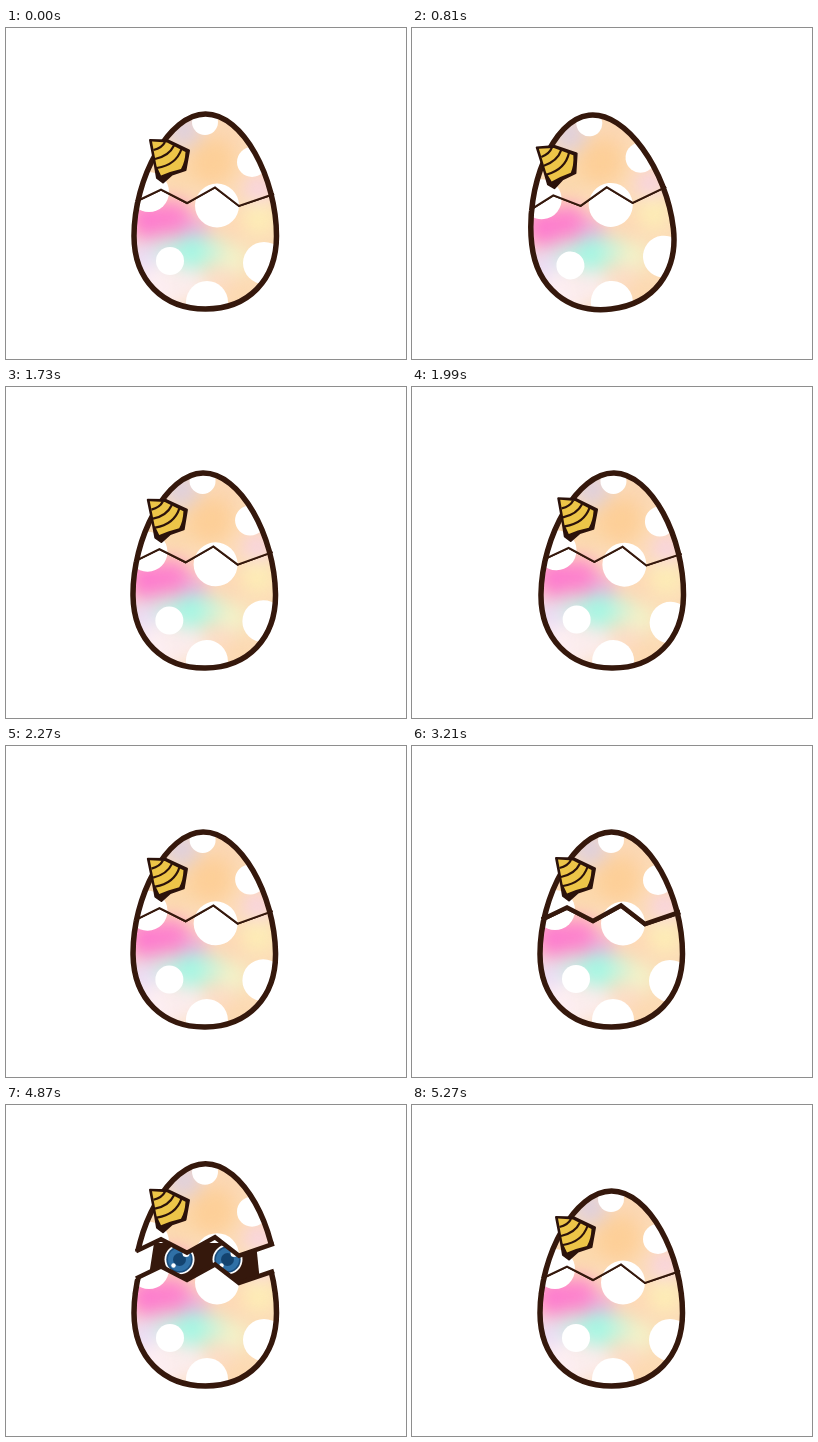
Recreate the animation shown at these times as an HTML page. Size 400 px wide and 331 px high, loop 6.37 s.

```html
<!DOCTYPE html>
<html lang="en">
<head>
<meta charset="utf-8">
<title>Hatching egg</title>
<style>
  html, body { margin: 0; width: 100%; height: 100%; overflow: hidden; background: #fff; }
  svg { display: block; width: 400px; height: 331px; }
  .line { fill: none; stroke: #35180c; stroke-width: 5.5; }
  .crack { fill: none; stroke: #35180c; stroke-width: 2; }
  .open .crack { stroke-width: 4.5; }
  #chick { display: none; }
  .open #chick { display: inline; }
</style>
</head>
<body>
<svg viewBox="0 0 400 331">
  <defs>
    <path id="shell" d="M199.500 86C163 86 128 150 128 208C128 252 157 281 199.500 281C242 281 270.500 252 270.500 208C270.500 150 237 86 199.500 86Z"/>
    <polyline id="zigzag" points="130,173.500 155,161.500 181,175 209,159.500 233,178 268,166"/>
    <clipPath id="shellClip"><use href="#shell"/></clipPath>
    <clipPath id="topClip"><path d="M100 60H300V159L268 166L233 178L209 159.500L181 175L155 161.500L130 173.500L100 188Z"/></clipPath>
    <clipPath id="bottomClip"><path d="M100 300H300V159L268 166L233 178L209 159.500L181 175L155 161.500L130 173.500L100 188Z"/></clipPath>
    <filter id="soft" x="-30%" y="-30%" width="160%" height="160%" color-interpolation-filters="sRGB">
      <feGaussianBlur stdDeviation="9"/>
    </filter>
    <g id="skin" clip-path="url(#shellClip)">
      <rect x="120" y="80" width="160" height="210" fill="#fcdcb8"/>
      <g id="blobs" filter="url(#soft)"></g>
      <g id="dots" fill="#fff"></g>
    </g>
    <g id="eye">
      <circle r="15" fill="#fff"/>
      <circle r="13.200" fill="#1b4d7c"/>
      <circle r="11.500" fill="#2f70a6"/>
      <circle r="6.500" fill="#13436f"/>
      <circle cx="6.500" cy="-6" r="3.500" fill="#fff"/>
      <circle cx="-6" cy="6" r="2.200" fill="#fff"/>
    </g>
  </defs>

  <g id="egg">
    <g id="chick">
      <path d="M148 138H250L254 177H142Z" fill="#35180c"/>
      <use href="#eye" x="173.500" y="154.500"/>
      <use href="#eye" x="221.500" y="154.500"/>
    </g>
    <g>
      <g clip-path="url(#bottomClip)">
        <use href="#skin"/>
        <use href="#shell" class="line"/>
      </g>
      <use href="#zigzag" class="crack"/>
    </g>
    <g id="cap">
      <g clip-path="url(#topClip)">
        <use href="#skin"/>
        <use href="#shell" class="line"/>
      </g>
      <use href="#zigzag" class="crack"/>
      <g stroke="#2b120b" stroke-linejoin="round">
        <path d="M144 112L162 112.500L183 122.500L179.500 142L166 146.500L157 154.500L151 150L149 138Z" fill="#2b120b" stroke-width="2"/>
        <path d="M146 113.500L161 114.500L179.500 124Q179 134 175 141L164 144L155 147.500L150.500 138Z" fill="#edc548" stroke="none"/>
        <path d="M147.500 122Q156 120 159 114M149 131Q163 128 168 117.500M151 140Q170 137 175.500 121" fill="none" stroke-width="2.200"/>
      </g>
    </g>
  </g>
</svg>
<script>
const LOOP = 6370, STEP = 20, PIVOT = '199.5 284', LIFT = 27, TILT = 8;
const SHAKES = [650, 1710], OPEN = 3210, SHUT = 4850, DONE = 5270;
const POSES = [0, TILT, -TILT, 0, TILT, -TILT, 0], POSE_MS = 100;
const $ = id => document.getElementById(id);

const circle = (parent, cx, cy, r, fill) => {
  const el = document.createElementNS('http://www.w3.org/2000/svg', 'circle');
  for (const [name, value] of Object.entries({ cx, cy, r })) el.setAttribute(name, value);
  if (fill) el.setAttribute('fill', fill);
  parent.append(el);
};

[
  [178, 102, 18, '#dfd0dc'], [222, 105, 20, '#fbd7b4'], [206, 134, 24, '#fdcf98'],
  [172, 148, 16, '#fbd8ac'], [253, 162, 15, '#f8d3e2'],
  [140, 262, 34, '#fdeef2'], [180, 256, 20, '#fbecec'], [134, 228, 16, '#ebdaf4'],
  [142, 192, 19, '#fd7bcf'], [167, 190, 18, '#fd80cd'], [190, 200, 13, '#f2a6da'],
  [160, 222, 13, '#c9ece9'], [187, 223, 18, '#a2f7e4'], [208, 224, 13, '#c8f4dc'],
  [228, 232, 15, '#f2f3c8'], [218, 254, 15, '#fcdcc8'], [233, 268, 16, '#fcd9b0'],
  [227, 197, 15, '#fdd8b6'], [253, 190, 17, '#fdedb6']
].forEach(blob => circle($('blobs'), ...blob));

[
  [199, 94, 13], [246, 134, 15], [143, 164, 20], [211, 177.5, 22],
  [164, 233, 14], [258, 235, 21], [201, 274, 21]
].forEach(dot => circle($('dots'), ...dot));

// Eases with a dip before and an overshoot after.
function backInOut(p) {
  const s = 2.595;
  const dip = q => q * q * ((s + 1) * q - s) / 2;
  if (p <= 0) return 0;
  if (p >= 1) return 1;
  return p < 0.5 ? dip(2 * p) : 1 - dip(2 - 2 * p);
}

function tilt(ms) {
  const i = Math.floor(ms / POSE_MS);
  if (i < 0 || i >= POSES.length - 1) return 0;
  return POSES[i] + (POSES[i + 1] - POSES[i]) * backInOut(ms / POSE_MS - i);
}

function draw(now) {
  // The picture changes every 20 ms, on 10, 30, 50...
  const t = Math.floor((now % LOOP - 10) / STEP) * STEP + 10;
  const angle = SHAKES.reduce((sum, start) => sum + tilt(t - start), 0);
  const rise = LIFT * (backInOut((t - OPEN) / 480) - backInOut((t - SHUT) / 400));
  $('egg').setAttribute('transform', `rotate(${angle} ${PIVOT})`);
  $('egg').classList.toggle('open', t >= OPEN && t < DONE);
  $('cap').setAttribute('transform', `translate(0 ${-rise})`);
}

function frame() {
  draw(performance.now());
  requestAnimationFrame(frame);
}
frame();
</script>
</body>
</html>
```
